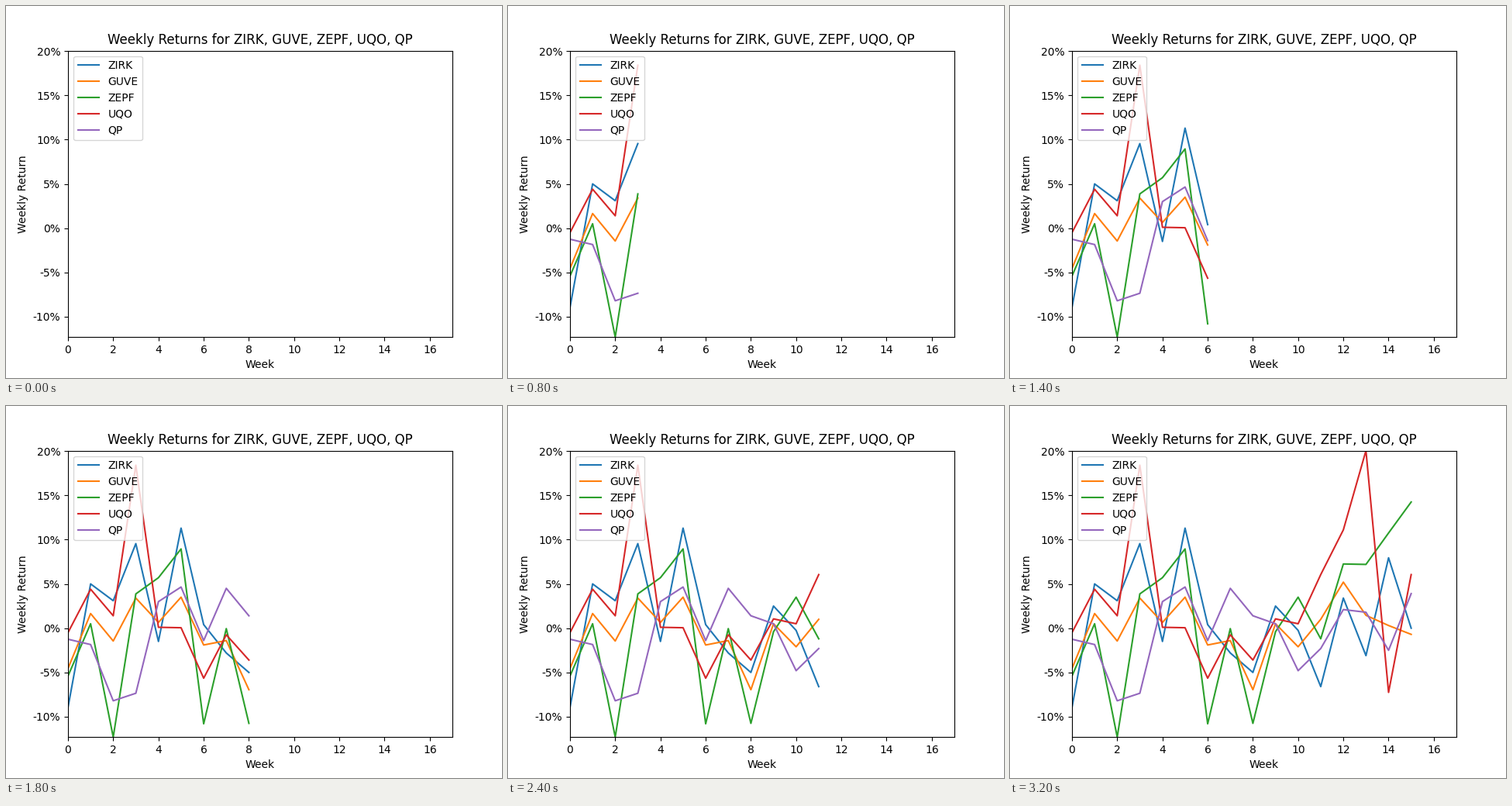
A matplotlib script that plays this animation: 640 px wide and 480 px high, repeating every 3400 ms.

```python
import matplotlib.pyplot as plt
from matplotlib.animation import FuncAnimation

FRAMES = 17
STEP_MS = 200

# weekly returns in percent
RETURNS = {
    "ZIRK": [-8.95, 5.0, 3.1, 9.55, -1.5, 11.3, 0.4, -2.8,
             -5.0, 2.5, -0.25, -6.6, 3.4, -3.1, 7.95, 0.0],
    "GUVE": [-4.55, 1.65, -1.45, 3.4, 0.65, 3.5, -1.9, -1.4,
             -6.95, 0.5, -2.1, 1.0, 5.2, 1.45, 0.3, -0.7],
    "ZEPF": [-5.4, 0.5, -12.3, 3.87, 5.7, 8.95, -10.8, -0.05,
             -10.75, -0.4, 3.5, -1.2, 7.25, 7.2, 10.75, 14.25],
    "UQO": [-0.5, 4.4, 1.4, 18.4, 0.1, 0.05, -5.65, -0.75,
            -3.6, 1.05, 0.5, 6.05, 11.1, 20.05, -7.25, 6.05],
    "QP": [-1.25, -1.85, -8.2, -7.35, 3.0, 4.65, -1.4, 4.5,
           1.4, 0.5, -4.8, -2.3, 2.1, 1.8, -2.5, 3.9],
}

fig, ax = plt.subplots(figsize=(6.4, 4.8), dpi=100)
lines = {name: ax.plot([], [], label=name)[0] for name in RETURNS}

ax.set_xlim(0, FRAMES)
ax.set_ylim(-12.3, 20.05)
ax.set_yticks(range(-10, 21, 5))
ax.yaxis.set_major_formatter(lambda v, _: f"{v:.0f}%")
ax.set_xlabel("Week")
ax.set_ylabel("Weekly Return")
ax.set_title("Weekly Returns for " + ", ".join(RETURNS))
ax.legend(loc="upper left")


def update(count):
    """Show the first `count` weeks of every series."""
    for name, line in lines.items():
        line.set_data(range(count), RETURNS[name][:count])
    return list(lines.values())


anim = FuncAnimation(fig, update, frames=FRAMES, interval=STEP_MS,
                     init_func=lambda: update(0), repeat=True, repeat_delay=0)
plt.show()
```
